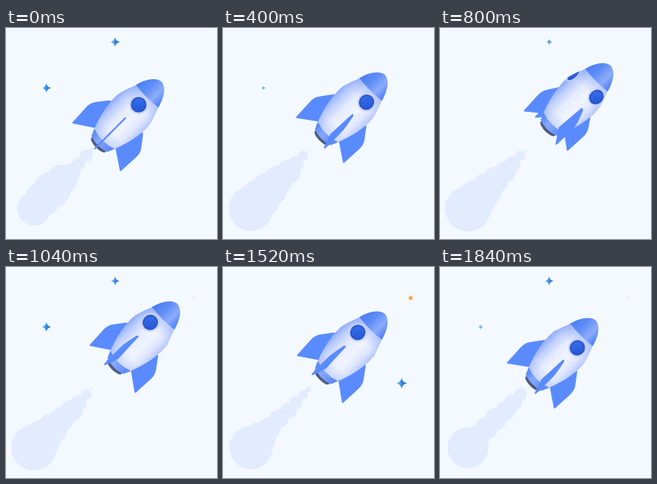
Write an HTML page with a canvas that moves like this. It is 264 by 264 pixels and loops after 1.92 s.

```html
<!DOCTYPE html>
<html>
<head>
<meta charset="utf-8">
<style>
html, body { margin: 0; height: 100%; overflow: hidden; background: #f3f9ff; }
canvas { display: block; width: 264px; height: 264px; }
</style>
</head>
<body>
<canvas id="stage"></canvas>
<script>
const LOOP = 1920, STEP = 80, TAU = Math.PI * 2;
const canvas = document.getElementById('stage');
const dpr = window.devicePixelRatio || 1;
canvas.width = canvas.height = 264 * dpr;
const ctx = canvas.getContext('2d');
ctx.scale(dpr, dpr);

// Rocket space: nose points up, x runs across the hull.
const hull = new Path2D('M0-90C10-89 16.5-77 20-64.5C24-53 28-45 28-35C28-18 22 2 17.5 12L14 20Q0 25-14 20L-17.5 12C-22 2-28-18-28-35C-28-45-24-53-20-64.5C-16.5-77-10-89 0-90Z');
const cap = new Path2D('M-30-100H30V-64.5H20Q0-62-20-64.5H-30Z');
const band = new Path2D('M-30 11H-18Q0 17 18 11H30V30H-30Z');

function gradient(x0, y0, x1, y1, stops) {
  const g = ctx.createLinearGradient(x0, y0, x1, y1);
  stops.forEach(([at, color]) => g.addColorStop(at, color));
  return g;
}
const hullFill = gradient(-28, 0, 28, 0, [[0, '#8dabfa'], [.16, '#bccdfd'], [.38, '#e6ecff'], [.62, '#f1f4ff'], [.82, '#dfe6ff'], [1, '#b3c5fc']]);
const hullShade = gradient(0, -66, 0, 14, [[0, 'rgba(95,135,245,.4)'], [.25, 'rgba(95,135,245,0)'], [.8, 'rgba(95,135,245,0)'], [1, 'rgba(95,135,245,.25)']]);
const capFill = gradient(-20, 0, 20, 0, [[0, '#4a7ef5'], [.35, '#5f8df6'], [.68, '#8cacfa'], [1, '#4a7cf5']]);
const bandFill = gradient(-18, 0, 18, 0, [[0, '#4f82f6'], [.4, '#86a9fb'], [1, '#5585fb']]);
const glassFill = gradient(-8, -8, 8, 8, [[0, '#3a70ee'], [1, '#2355d2']]);
const starFill = gradient(-6, 0, 6, 0, [[0, '#6fd0fb'], [.5, '#3a8ce6'], [1, '#1f57d0']]);

const clamp = v => Math.min(1, Math.max(0, v));
const smooth = v => { v = clamp(v); return v * v * (3 - 2 * v); };
// Rises from a to b, holds, falls from c to d.
const pulse = (t, a, b, c, d) => smooth((t - a) / (b - a)) * smooth((d - t) / (d - c));

function disc(x, y, r, fill) {
  ctx.fillStyle = fill;
  ctx.beginPath();
  ctx.arc(x, y, r, 0, TAU);
  ctx.fill();
}

function star(x, y, r) {
  if (r < .05) return;
  ctx.save();
  ctx.translate(x, y);
  ctx.scale(r / 6, r / 6);
  ctx.globalAlpha = clamp(.3 + r / 8);
  ctx.fillStyle = starFill;
  ctx.fill(new Path2D('M0-6Q1-1 6 0Q1 1 0 6Q-1 1-6 0Q-1-1 0-6Z'));
  ctx.restore();
}

const puffs = [[107, 153], [100.5, 159.5], [91, 170], [82, 180], [70, 190], [58, 202], [46, 214], [35, 226]];
// Time, then the radius of each puff.
const plume = [
  [0, 3, 8, 8, 11, 19, 23, 22, 21],
  [400, 1.5, 6, 10, 15, 18, 22, 25, 28],
  [640, 1, 6, 9.5, 13, 17, 21, 25, 28.5],
  [1040, 1.5, 6.5, 10, 13.5, 15, 19, 23, 28.5],
  [1280, 2, 6, 7.5, 9, 16, 20, 20, 26],
  [1520, 3, 6, 8.5, 10, 11.5, 14, 20, 27],
  [1840, 1, 8, 11, 12, 14, 14, 16, 25.5]
];

function smoke(t) {
  let i = 0;
  while (i < plume.length - 2 && t >= plume[i + 1][0]) i++;
  const a = plume[i], b = plume[i + 1];
  const k = clamp((t - a[0]) / (b[0] - a[0]));
  puffs.forEach(([x, y], n) => disc(x, y, a[n + 1] + (b[n + 1] - a[n + 1]) * k, '#e2ebff'));
}

function fin(angle) {
  const s = Math.sin(angle), c = Math.cos(angle);
  const at = (r, y) => [r * s, y + r * c * .08];
  ctx.beginPath();
  ctx.moveTo(...at(25, -28));
  ctx.lineTo(...at(29, -27));
  ctx.lineTo(...at(39, -14));
  ctx.quadraticCurveTo(...at(44, -8), ...at(43.2, 0));
  ctx.lineTo(...at(42, 24.5));
  ctx.lineTo(...at(19, 9));
  ctx.closePath();
  ctx.fillStyle = ctx.strokeStyle = '#5a8bfe';
  ctx.lineWidth = 2;
  ctx.lineJoin = 'round';
  ctx.fill();
  ctx.stroke();
}

function porthole(angle) {
  const c = Math.cos(angle);
  if (c < .05) return;
  ctx.save();
  ctx.translate(30 * Math.sin(angle), -49.5);
  ctx.scale(c, 1);
  disc(0, 0, 12, 'rgba(195,208,252,.75)');
  disc(0, 0, 9.8, '#2a55c4');
  disc(0, 0, 8, glassFill);
  ctx.restore();
}

function rocket(t) {
  const turn = t / LOOP * TAU;
  const lift = (1 - Math.cos(turn)) / 2 + .03 * Math.sin(turn) ** 2;
  const sides = [0, 1, 2, 3].map(n => n * TAU / 4 - turn);
  // Fins near the silhouette tuck behind the hull.
  const isFront = a => Math.cos(a) > .6;

  ctx.save();
  ctx.translate(131 + 20.3 * lift, 131 - 21.5 * lift);
  ctx.rotate(Math.PI / 4);
  sides.filter(a => !isFront(a)).forEach(fin);

  ctx.fillStyle = '#4d5a80';
  ctx.beginPath();
  ctx.ellipse(0, 21.5, 12.5, 4.5, 0, 0, TAU);
  ctx.fill();

  ctx.save();
  ctx.clip(hull);
  for (const [fill, shape] of [[hullFill, hull], [hullShade, hull], [capFill, cap], [bandFill, band]]) {
    ctx.fillStyle = fill;
    ctx.fill(shape);
  }
  sides.forEach(porthole);
  ctx.restore();

  sides.filter(isFront).forEach(fin);
  ctx.restore();
}

function draw(now) {
  const t = Math.floor(now % LOOP / STEP) * STEP;
  const half = t % 960;
  ctx.fillStyle = '#f3f9ff';
  ctx.fillRect(0, 0, 264, 264);
  smoke(t);

  star(136.5, 17.5, 6 * Math.max(pulse(half, 570, 950, 961, 1300), pulse(half, -400, -10, 10, 390)));
  star(50.5, 75, 6 * Math.max(pulse(half, 780, 980, 1200, 1500), pulse(half, -180, 20, 220, 560)));
  const late = pulse(t, 960, 1400, 1480, 1920);
  star(223.5, 145.5, 6.8 * late);
  ctx.globalAlpha = late;
  disc(234.8, 38.7, 2.5, '#f9a63a');
  ctx.globalAlpha = 1;

  rocket(t);
}

const start = performance.now();
function tick() {
  draw(performance.now() - start);
  requestAnimationFrame(tick);
}
tick();
</script>
</body>
</html>
```
